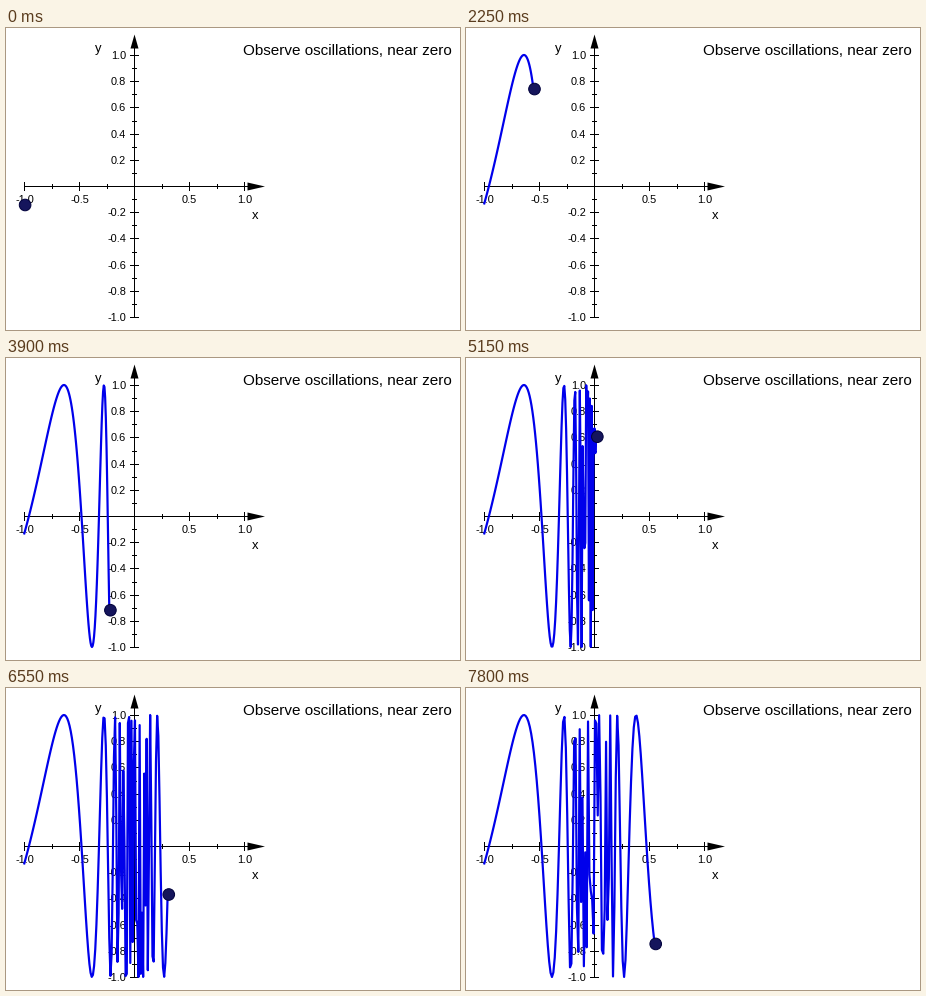
A matplotlib script that plays this animation: 454 by 302 pixels, repeating every 8 s.

```python
import numpy as np
import matplotlib.pyplot as plt
from matplotlib.animation import FuncAnimation
from matplotlib.patches import Circle, Polygon

W, H, DPI = 454, 302, 100
PT = 72 / DPI                 # points per pixel
X0, Y0 = 128.5, 158.5         # pixel position of the origin
SX, SY = 110, 131             # pixels per unit
STEPS, MESH = 49, 124
BLUE, NAVY = "#0000eb", "#15155c"

plt.rcParams["font.family"] = "Liberation Sans"


def px(x):
    return X0 + SX * x


def py(y):
    return Y0 - SY * y


def wave(x):
    return np.sin(3 / x)


fig = plt.figure(figsize=(W / DPI, H / DPI), dpi=DPI, facecolor="white")
ax = fig.add_axes([0, 0, 1, 1])
ax.set_xlim(0, W)
ax.set_ylim(H, 0)
ax.axis("off")


def line(x1, y1, x2, y2):
    ax.plot([x1, x2], [y1, y2], color="black", lw=PT, zorder=1,
            solid_capstyle="butt", snap=False)


def label(x, y, text, size, ha="center"):
    ax.text(x, y, text, fontsize=size * PT, ha=ha, va="baseline", zorder=2)


def arrow(points):
    ax.add_patch(Polygon(points, fc="black", ec="none", zorder=1))


def draw_axes():
    line(18, Y0, 250, Y0)
    line(X0, 16, X0, 290)
    arrow([(259, Y0), (241.5, Y0 - 4), (241.5, Y0 + 4)])
    arrow([(X0, 6.5), (X0 - 4, 20.5), (X0 + 4, 20.5)])

    for i in range(-4, 5):
        if i == 0:
            continue
        x = np.floor(px(i / 4)) + 0.5
        size = 2.5 if i % 2 else 4.5
        line(x, Y0 - size, x, Y0 + size)
        if i % 2 == 0:
            label(x, 175, f"{i / 4:.1f}", 11)

    for i in range(-10, 11):
        if i == 0:
            continue
        y = np.floor(py(i / 10)) + 0.5
        size = 2.5 if i % 2 else 4.5
        line(X0 - size, y, X0 + size, y)
        if i % 2 == 0:
            label(120, y + 3.5, f"{i / 10:.1f}", 11, ha="right")

    label(91.8, 24, "y", 13)
    label(249.5, 191, "x", 13)
    label(237.2, 27, "Observe oscillations, near zero", 15.2, ha="left")


draw_axes()
curve, = ax.plot([], [], color=BLUE, lw=2.2 * PT, zorder=3,
                 solid_joinstyle="round", solid_capstyle="butt")
ball = Circle((0, 0), 5.8, fc=NAVY, ec="#00003c", lw=PT, zorder=4)
ax.add_patch(ball)


def update(n):
    end = -1 + 2 * n / STEPS
    x = np.linspace(-1, end, MESH)
    curve.set_data(px(x) - 0.5, py(wave(x)) - 0.5)
    ball.center = px(end) + 0.6, py(wave(end))
    return curve, ball


# Each step holds for 200 ms, every twelfth for 250 ms.
TICK = 50
holds = [n for n in range(39) for _ in range(4 if n % 12 else 5)]
anim = FuncAnimation(fig, update, frames=holds, interval=TICK,
                     init_func=lambda: update(0), repeat=True,
                     repeat_delay=0, blit=False)
plt.show()
```
